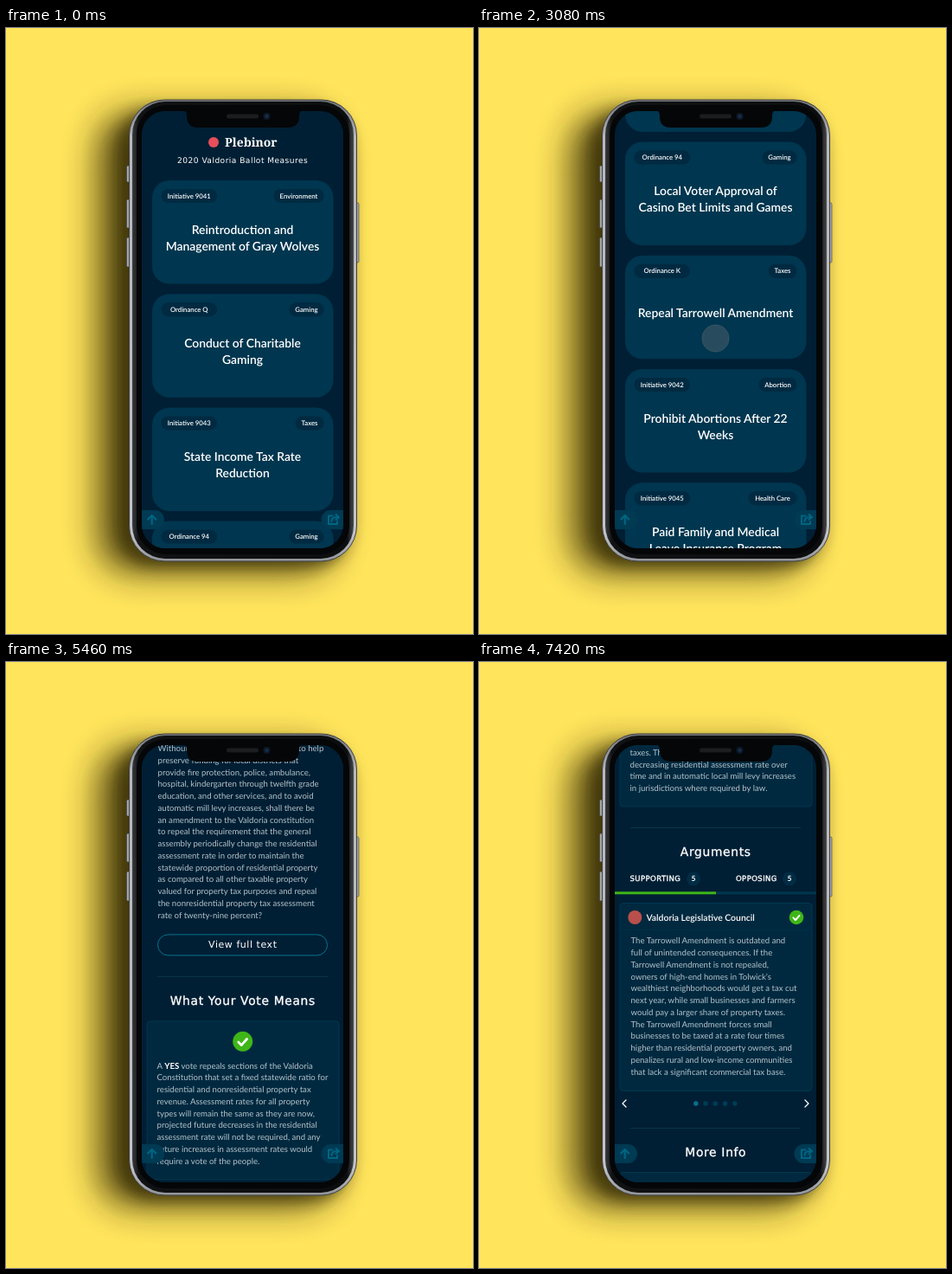
Recreate the animation shown at these times as an HTML page. Size 540 by 700 pixels, loop 8 s.

```html
<!DOCTYPE html>
<html lang="en">
<head>
<meta charset="utf-8">
<title>Ballot guide</title>
<style>
  html, body { margin: 0; width: 100%; height: 100%; overflow: hidden; background: #ffe45c; }
  svg { display: block; width: 540px; height: 700px; }
  text { font-family: Lato, "Open Sans", sans-serif; fill: #fff; text-rendering: geometricPrecision; }
  .wide { font-family: "DejaVu Sans", sans-serif; letter-spacing: .05em; }
  .head { stroke: #fff; stroke-width: .35px; }
  .semi { font-weight: 600; }
  .bold { font-weight: 700; }
  .body { fill: #b3c2ca; }
  .brand { font-family: "Noto Serif", serif; font-weight: 700; }
  .mid { text-anchor: middle; }
  .line { fill: none; stroke-linecap: round; stroke-linejoin: round; }
</style>
</head>
<body>
<svg viewBox="0 0 540 700">
  <defs>
    <clipPath id="screenClip"><rect x="157" y="96" width="233" height="505" rx="27"/></clipPath>
    <filter id="wideBlur" x="-50%" y="-30%" width="200%" height="160%"><feGaussianBlur stdDeviation="19"/></filter>
    <filter id="nearBlur" x="-50%" y="-30%" width="200%" height="160%"><feGaussianBlur stdDeviation="8"/></filter>
    <linearGradient id="steel" x2="0" y2="1">
      <stop offset="0" stop-color="#6f7276"/><stop offset=".08" stop-color="#b6b8bc"/>
      <stop offset=".5" stop-color="#b9bbbf"/><stop offset=".94" stop-color="#c2c4c8"/>
      <stop offset="1" stop-color="#909397"/>
    </linearGradient>
    <linearGradient id="bezel">
      <stop offset="0" stop-color="#3b3c3f"/><stop offset=".03" stop-color="#111214"/>
      <stop offset=".97" stop-color="#0c0d0f"/><stop offset="1" stop-color="#48494c"/>
    </linearGradient>
  </defs>

  <rect width="540" height="700" fill="#ffe45c"/>
  <rect x="105" y="98" width="276" height="532" rx="42" fill="#2a2200" opacity=".75" filter="url(#wideBlur)"/>
  <rect x="129" y="93" width="270" height="529" rx="42" fill="#2a2200" opacity=".55" filter="url(#nearBlur)"/>

  <g fill="#a4a6aa" stroke="#3c3d40" stroke-width=".6">
    <rect x="139.500" y="159" width="4" height="19" rx="1.500"/>
    <rect x="139.500" y="198" width="4" height="33" rx="1.500"/>
    <rect x="139.500" y="242" width="4" height="34" rx="1.500"/>
    <rect x="404" y="202" width="4" height="69" rx="1.500"/>
  </g>
  <rect x="142.500" y="83" width="263" height="533" rx="41" fill="url(#steel)" stroke="#3e4043"/>
  <rect x="146" y="85" width="256" height="528" rx="38" fill="url(#bezel)"/>
  <rect x="151" y="89" width="246" height="519" rx="34" fill="#050608"/>

  <g clip-path="url(#screenClip)">
    <rect x="157" y="96" width="233" height="505" fill="#001f34"/>
    <g id="list"></g>
    <g id="detail"></g>
    <circle id="touch" cx="273.500" cy="358.500" r="15.700" fill="#b49a90" fill-opacity=".22" stroke="#b49a90" stroke-opacity=".15"/>
    <g id="controls"></g>
  </g>

  <path d="M203 95q6 0 6 6v1q0 13 13 13h104q13 0 13-13v-1q0-6 6-6z" fill="#050608"/>
  <rect x="255" y="99.500" width="37" height="5" rx="2.500" fill="#1c1d1f"/>
  <circle cx="301.500" cy="102" r="4" fill="#0d1a2a"/>
  <circle cx="301.500" cy="102" r="1.800" fill="#173250"/>
</svg>

<script>
const byId = id => document.getElementById(id);

// Markup helpers; y is the vertical middle of a text line.
const text = (x, y, size, cls, str) =>
  `<text x="${x}" y="${y + size * 0.34}" font-size="${size}" class="${cls}">${str}</text>`;
const lines = (x, y, step, size, cls, list) =>
  list.map((str, i) => text(x, y + i * step, size, cls, str)).join('');
const box = (x, y, w, h, r, fill, stroke = 'none') =>
  `<rect x="${x}" y="${y}" width="${w}" height="${h}" rx="${r}" fill="${fill}" stroke="${stroke}"/>`;
const dot = (x, y, r, fill) => `<circle cx="${x}" cy="${y}" r="${r}" fill="${fill}"/>`;
const stroke = (d, color, width) =>
  `<path class="line" d="${d}" stroke="${color}" stroke-width="${width}"/>`;
const pill = (x, y, w, fill, str) =>
  box(x, y - 8, w, 16, 8, fill) + text(x + w / 2, y, 7.75, 'semi mid', str);
const rule = y => box(175, y - 0.5, 197, 1, 0, '#0a344b');
const heading = (y, str, size = 13.8) => text(273.8, y, size, 'wide head mid', str);
const panel = (y, h) => box(163, y, 222, h, 4, '#00293f', '#003750');
const paragraph = (x, y, list) => lines(x, y, 13.75, 9.65, 'body', list);
const tick = (x, y, r) => dot(x, y, r, '#3fb618') +
  stroke(`M${x - r * .43} ${y + r * .05}l${r * .3} ${r * .32}l${r * .55} ${-r * .62}`, '#fff', r * .24);
const cross = (x, y, r) => dot(x, y, r, '#d8434c') +
  stroke(`M${x - r * .3} ${y - r * .3}l${r * .6} ${r * .6}m0 ${-r * .6}l${-r * .6} ${r * .6}`, '#fff', r * .3);
const chevron = (x, y, w, h) => stroke(`M${x + w} ${y - h}l${-2 * w} ${h}l${2 * w} ${h}`, '#fff', 1.2);

const header = dot(240, 132, 6, '#e5505a') +
  text(253, 132, 13.9, 'brand', 'Plebinor') +
  text(273.7, 153, 9.1, 'wide mid', '2020 Valdoria Ballot Measures');

const measures = [
  ['Initiative 9041', 'Environment', 46, 'Reintroduction and', 'Management of Gray Wolves'],
  ['Ordinance Q', 'Gaming', 28, 'Conduct of Charitable', 'Gaming'],
  ['Initiative 9043', 'Taxes', 21, 'State Income Tax Rate', 'Reduction'],
  ['Ordinance 94', 'Gaming', 28, 'Local Voter Approval of', 'Casino Bet Limits and Games'],
  ['Ordinance K', 'Taxes', 21, 'Repeal Tarrowell Amendment'],
  ['Initiative 9042', 'Abortion', 32, 'Prohibit Abortions After 22', 'Weeks'],
  ['Initiative 9045', 'Health Care', 44, 'Paid Family and Medical', 'Leave Insurance Program'],
];

const card = ([label, topic, topicWidth, ...title], i) => {
  const y = 176 + i * 131.2;
  return box(169, y, 209.5, 119.5, 20, '#00364f') +
    pill(179.5, y + 18, 64.5, '#002a41', label) +
    pill(367.5 - topicWidth - 12, y + 18, topicWidth + 12, '#002a41', topic) +
    lines(273.5, y + 66.5 - (title.length - 1) * 9.4, 18.8, 13.9, 'semi mid', title);
};

byId('list').innerHTML = header + measures.map(card).join('');

const summary = [
  'Repeal the Tarrowell Amendment', 'requiring residential and',
  'nonresidential property tax revenues', 'to make up the same portion of total',
  'statewide property taxes as when the', 'Tarrowell Amendment was adopted',
  'in 1982, including the requirement', 'that sets the nonresidential',
  'assessment rate at 29 percent.'];

const official = [
  'Without increasing property tax rates, to help', 'preserve funding for local districts that',
  'provide fire protection, police, ambulance,', 'hospital, kindergarten through twelfth grade',
  'education, and other services, and to avoid', 'automatic mill levy increases, shall there be',
  'an amendment to the Valdoria constitution', 'to repeal the requirement that the general',
  'assembly periodically change the residential', 'assessment rate in order to maintain the',
  'statewide proportion of residential property', 'as compared to all other taxable property',
  'valued for property tax purposes and repeal', 'the nonresidential property tax assessment',
  'rate of twenty-nine percent?'];

const strong = str => `<tspan class="bold" fill="#fff">${str}</tspan>`;

const yesMeaning = [
  `A ${strong('YES')} vote repeals sections of the Valdoria`, 'Constitution that set a fixed statewide ratio for',
  'residential and nonresidential property tax', 'revenue. Assessment rates for all property',
  'types will remain the same as they are now,', 'projected future decreases in the residential',
  'assessment rate will not be required, and any', 'future increases in assessment rates would',
  'require a vote of the people.'];

const noMeaning = [
  `A ${strong('NO')} vote leaves constitutional provisions`, 'related to property taxes in place, maintaining',
  'current requirements for setting the', 'assessment rates used to calculate property',
  'taxes. This is expected to result in a', 'decreasing residential assessment rate over',
  'time and in automatic local mill levy increases', 'in jurisdictions where required by law.'];

const argument = [
  'The Tarrowell Amendment is outdated and', 'full of unintended consequences. If the',
  'Tarrowell Amendment is not repealed,', 'owners of high-end homes in Tolwick’s',
  'wealthiest neighborhoods would get a tax cut', 'next year, while small businesses and farmers',
  'would pay a larger share of property taxes.', 'The Tarrowell Amendment forces small',
  'businesses to be taxed at a rate four times', 'higher than residential property owners, and',
  'penalizes rural and low-income communities', 'that lack a significant commercial tax base.'];

const tab = (x, countX, label) => text(x, 1310.5, 8.5, 'wide head', label) +
  dot(countX, 1310.5, 8, '#002c44') + text(countX, 1310.5, 8.6, 'bold mid', '5');

byId('detail').innerHTML = [
  box(157, 0, 233, 1800, 0, '#001f34'),
  header,
  chevron(171.3, 139.5, 2.7, 6),
  rule(176.5),
  text(273.7, 195.5, 8.6, 'wide mid', 'ORDINANCE K'),
  heading(223, 'Repeal Tarrowell', 15.6), heading(243, 'Amendment', 15.6),
  pill(224, 275, 99, '#003e57', 'Legislative Amendment'),
  pill(197, 297.5, 113, '#003e57', 'Passes With a Majority Vote'),
  pill(315, 297.5, 36, '#003e57', 'Taxes'),
  rule(318.5),
  dot(177, 344.5, 2, '#0b6c8e'),
  lines(184.5, 344.5, 15, 11.2, '', summary),
  rule(492),
  heading(520, 'Official Language'),
  paragraph(175.5, 550.5, official),
  box(175.5, 765.5, 196, 24, 12, 'none', '#08708f'),
  text(273.8, 777, 11, 'wide mid', 'View full text'),
  rule(814),
  heading(842, 'What Your Vote Means'),
  panel(865.5, 183), tick(273.7, 889, 11.5), paragraph(174.5, 917, yesMeaning),
  panel(1058.5, 168.5), cross(273.7, 1082, 11.5), paragraph(174.5, 1109.5, noMeaning),
  rule(1251.5),
  heading(1279, 'Arguments'),
  tab(174.5, 248, 'SUPPORTING'), tab(297, 359, 'OPPOSING'),
  box(157, 1325.3, 117, 3, 0, '#3fb618'), box(274, 1325.3, 116, 3, 0, '#00364f'),
  panel(1338.5, 217),
  dot(180.3, 1355, 8, '#b9504b'),
  text(193.5, 1355, 10.4, 'semi', 'Valdoria Legislative Council'),
  tick(367, 1355, 8.3),
  box(163, 1369, 222, 1, 0, '#002f47'),
  paragraph(175.5, 1382, argument),
  chevron(168, 1570, 2, 4), chevron(379, 1570, -2, 4),
  ...[0, 1, 2, 3, 4].map(i => dot(250.8 + i * 11.25, 1570, 2.7, i ? '#003c57' : '#08708f')),
  rule(1598.5),
  heading(1626, 'More Info'),
  panel(1649.5, 140),
].join('');

byId('controls').innerHTML =
  box(145, 557, 38, 22, 11, '#003a53') + box(364.5, 557, 38, 22, 11, '#003a53') +
  stroke('M168.700 573v-10m-4.500 4.500l4.500-4.500l4.500 4.500', '#006582', 2.2) +
  stroke('M377.500 563.500h-4.500v9.500h10v-3M376.500 570q0-5 6-5h2m-3-3l3.500 3l-3.500 3', '#006582', 2);

const LOOP = 8000, FRAME = 70, SCREEN_WIDTH = 233;

const ease = (t, start, end) => {
  const u = Math.min(1, Math.max(0, (t - start) / (end - start)));
  return u * u * (3 - 2 * u);
};
const move = (id, x, y) => byId(id).setAttribute('transform', `translate(${x} ${y})`);

function render(now) {
  const t = Math.floor((now % LOOP) / FRAME) * FRAME;
  const push = ease(t, 3150, 3570);
  move('list', -SCREEN_WIDTH * push, -438 * ease(t, 1080, 2660));
  move('detail', SCREEN_WIDTH * (1 - push), -1060 * ease(t, 3888, 7382));
  byId('touch').setAttribute('opacity', ease(t, 2730, 2940) - ease(t, 3080, 3290));
}

const startTime = performance.now();
function animate() {
  render(performance.now() - startTime);
  requestAnimationFrame(animate);
}
animate();
</script>
</body>
</html>
```
